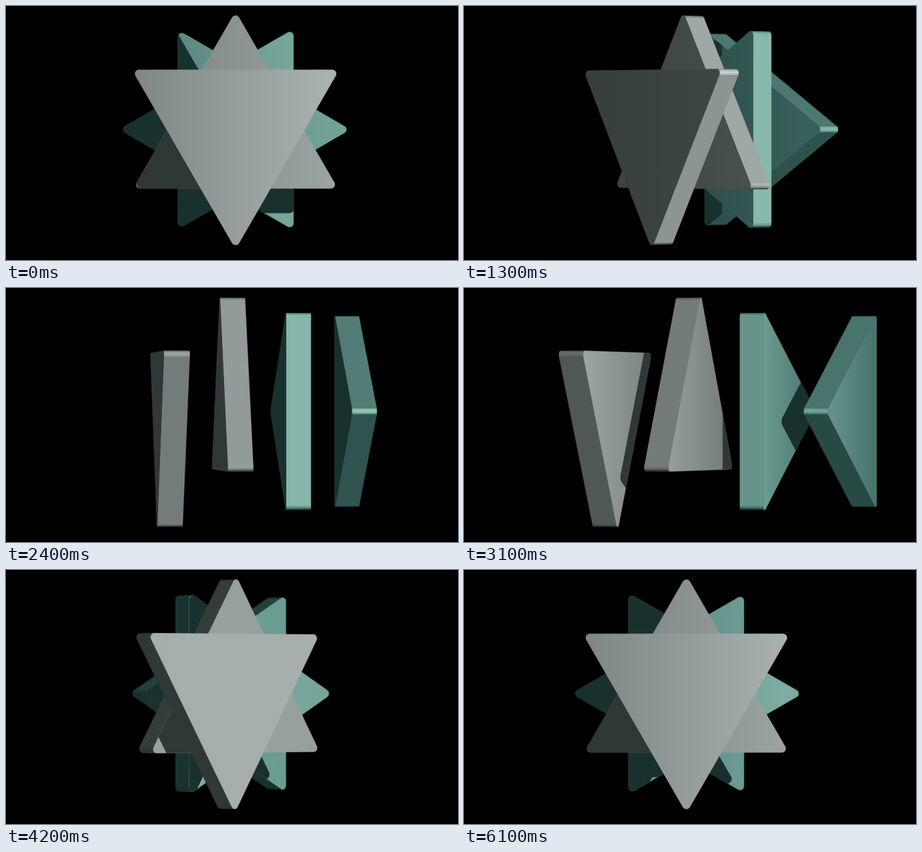
Write an HTML page with a canvas that moves like this. It is 690 px wide and 388 px high and loops after 8 s.

```html
<!DOCTYPE html>
<html lang="en">
<head>
<meta charset="utf-8">
<title>Turning prisms</title>
<style>
  html, body { margin: 0; width: 100%; height: 100%; overflow: hidden; background: #000; }
  canvas { display: block; width: 100vw; height: 100vh; }
</style>
</head>
<body>
<canvas id="stage" width="690" height="388"></canvas>
<script>
const ctx = document.getElementById('stage').getContext('2d');
const LOOP = 8000, STEP = 100, TURN_END = 5200;
const CAMERA = 7500, CENTER_X = 345, CENTER_Y = 188.7;
const RADIUS = 182, ROUNDING = 6, HALF_DEPTH = 19.4, ARC_STEPS = 5;
const LIGHT = [660, -230, 950], LIGHT_REACH = 1160, LIGHT_POWER = 125;

const grey = g => `rgb(${g - 9},${g},${g - 1})`;
const teal = g => `rgb(${g * (0.43 + 0.0017 * g)},${g},${g * 0.94})`;

const prisms = [
  { point: 90, z: 0, color: grey, ambient: 56, gain: 1 },
  { point: -90, z: -100, color: grey, ambient: 56, gain: 1 },
  { point: 180, z: -228, color: teal, ambient: 49, gain: 1.35 },
  { point: 0, z: -310, color: teal, ambient: 49, gain: 1.35 }
];

const clamp = v => Math.min(1, Math.max(0, v));
const smooth = k => k * k * (3 - 2 * k);
const ease = (t, from, to) => smooth(clamp((t - from) / (to - from)));
const dot = (a, b) => a[0] * b[0] + a[1] * b[1] + a[2] * b[2];
const minus = (a, b) => a.map((v, i) => v - b[i]);

// triangle with rounded corners, clockwise on screen
function outline(point) {
  const points = [], reach = RADIUS - 2 * ROUNDING;
  for (let corner = 0; corner < 3; corner++) {
    const c = (point + corner * 120) * Math.PI / 180;
    for (let s = 0; s <= ARC_STEPS; s++) {
      const a = c + (s / ARC_STEPS * 2 - 1) * Math.PI / 3;
      points.push([reach * Math.cos(c) + ROUNDING * Math.cos(a),
                   reach * Math.sin(c) + ROUNDING * Math.sin(a)]);
    }
  }
  return points;
}
for (const prism of prisms) prism.outline = outline(prism.point);

function project([x, y, z]) {
  const scale = CAMERA / (CAMERA - z);
  return [CENTER_X + x * scale, CENTER_Y + y * scale];
}

function area(points) {
  return points.reduce((sum, [x, y], i) => {
    const [nx, ny] = points[(i + 1) % points.length];
    return sum + x * ny - nx * y;
  }, 0);
}

function trace(points) {
  ctx.beginPath();
  for (const [x, y] of points) ctx.lineTo(x, y);
  ctx.closePath();
}

function fill(points, style) {
  trace(points);
  ctx.fillStyle = ctx.strokeStyle = style;
  ctx.lineWidth = 0.5;
  ctx.fill();
  ctx.stroke();
}

// diffuse point light with falloff
function shade(prism, point, normal) {
  const ray = minus(LIGHT, point), distance = Math.hypot(...ray);
  const lit = Math.max(0, dot(normal, ray) / distance) * (LIGHT_REACH / distance) ** 2;
  return prism.color(prism.ambient + LIGHT_POWER * prism.gain * lit);
}

function quads(front, back) {
  return front.map((p, i) => {
    const j = (i + 1) % front.length;
    return [p, front[j], back[j], back[i]];
  });
}

function solid(prism, x, cos, sin) {
  const place = depth => ([u, v]) =>
    [x + u * cos - depth * sin, v, prism.z + u * sin + depth * cos];
  return { prism, place, center: [x, 0, prism.z],
           front: prism.outline.map(place(HALF_DEPTH)),
           back: prism.outline.map(place(-HALF_DEPTH)) };
}

function castShadow(caster, origin, normal, style) {
  const height = dot(minus(LIGHT, origin), normal);
  const drop = q => {
    const ray = minus(q, LIGHT), k = -height / dot(ray, normal);
    return project(LIGHT.map((v, i) => v + ray[i] * k));
  };
  const front = caster.front.map(drop), back = caster.back.map(drop);
  for (const shape of [front, back, ...quads(front, back)]) fill(shape, style);
}

function drawSolid(item, solids, cos, sin) {
  const { prism, place, center } = item;
  const front = item.front.map(project), back = item.back.map(project);

  quads(front, back).forEach((quad, i) => {
    if (area(quad) >= 0) return;
    const [ax, ay] = prism.outline[i];
    const [bx, by] = prism.outline[(i + 1) % front.length];
    const length = Math.hypot(bx - ax, by - ay);
    const nx = (by - ay) / length, ny = (ax - bx) / length;
    const middle = place(0)([(ax + bx) / 2, (ay + by) / 2]);
    fill(quad, shade(prism, middle, [nx * cos, ny, nx * sin]));
  });

  const facing = area(front) > 0 ? 1 : -1;
  const face = facing > 0 ? front : back;
  if (area(face) * facing <= 0) return;
  const normal = [-sin * facing, 0, cos * facing];
  const onFace = place(HALF_DEPTH * facing);
  const ends = [onFace([-150, 0]), onFace([150, 0])];
  const gradient = ctx.createLinearGradient(project(ends[0])[0], 0, project(ends[1])[0], 0);
  ends.forEach((end, i) => gradient.addColorStop(i, shade(prism, end, normal)));
  fill(face, gradient);

  const origin = onFace([0, 0]);
  if (dot(minus(LIGHT, origin), normal) <= 0) return;
  ctx.save();
  trace(face);
  ctx.clip();
  for (const other of solids)
    if (dot(minus(other.center, center), normal) > HALF_DEPTH)
      castShadow(other, origin, normal, prism.color(prism.ambient));
  ctx.restore();
}

function draw(t) {
  ctx.fillStyle = '#000';
  ctx.fillRect(0, 0, 690, 388);
  const p = t / TURN_END;
  const angle = (180 * p + 23 * p * (1 - p) ** 2.5) * Math.PI / 180;
  const cos = Math.cos(angle), sin = Math.sin(angle);
  const widest = 95.5 + 0.045 * Math.max(0, t - 2400);
  const spacing = widest * ease(t, 950, 1650) * (1 - ease(t, 3500, 4250));
  const solids = prisms.map((prism, i) => solid(prism, 5.5 * cos + (i - 1) * spacing, cos, sin));

  // parallel slabs: the one further along the visible normal covers the others
  const firstOnTop = (spacing * sin + 100 * cos) * cos > 0;
  const order = firstOnTop ? [...solids].reverse() : solids;
  for (const item of order) drawSolid(item, solids, cos, sin);
}

const start = performance.now();
function frame() {
  const t = (performance.now() - start) % LOOP;
  draw(Math.min(TURN_END, Math.floor(t / STEP) * STEP));
  requestAnimationFrame(frame);
}
frame();
</script>
</body>
</html>
```
